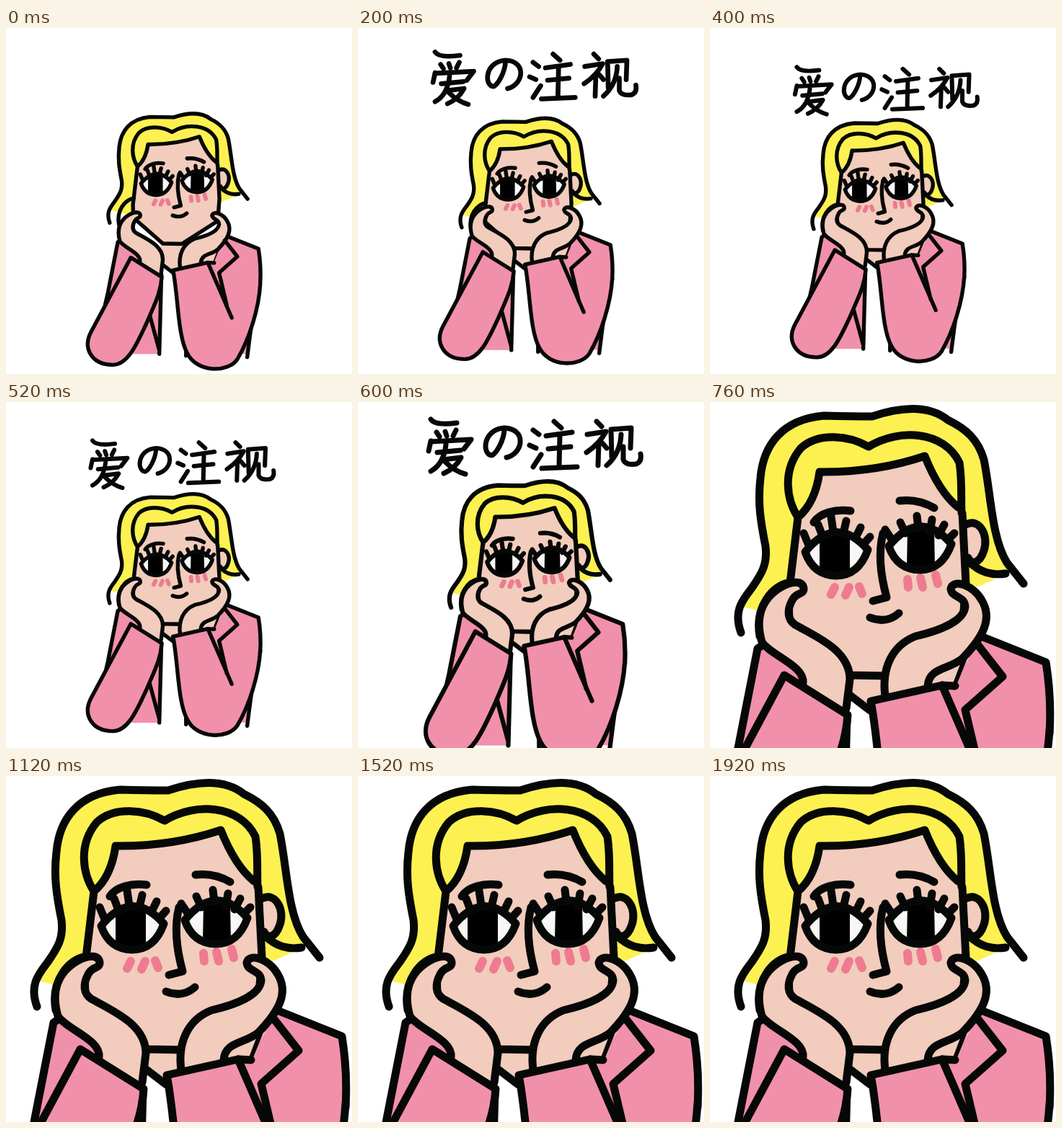
These frames come from a looping animation (480x480 px, 1960 ms). An HTML page:

```html
<!DOCTYPE html>
<html lang="zh">
<head>
<meta charset="utf-8">
<title>爱の注视</title>
<style>
  html, body { margin: 0; width: 100%; height: 100%; overflow: hidden; background: #fff; }
  svg { display: block; width: 100%; height: 100%; }
  path { fill: none; stroke-linecap: round; stroke-linejoin: round; }
  .ink { stroke: #060807; stroke-width: 11; }
  .skin { fill: #f2ccbc; }
  .hair { fill: #fdf151; }
  .coat { fill: #f190ab; }
  .white { fill: #f7f7f5; }
  .pupil { fill: #000; }
  .blush { stroke: #ee7b8f; stroke-width: 12; }
  #lettering path { stroke: #060807; stroke-width: 7; }
</style>
</head>
<body>
<svg viewBox="0 0 480 480">
  <g id="lettering" role="img" aria-label="爱の注视">
    <!-- 爱 -->
    <path d="M101 24Q107 33 137 29M109 42L113 48M121 41L123 47M136 39L132 47M101 54L98 68M101 55L157 52L147 65M110 70L142 67M122 59Q119 86 101 96M118 80L143 77Q135 92 119 99M121 83Q134 96 149 100"/>
    <!-- の -->
    <path d="M203 39C202 53 193 70 186 74C172 74 172 38 203 36C234 37 230 71 206 77"/>
    <!-- 注 -->
    <path d="M243 39L251 45M238 60L247 64M243 90L254 73M272 27L282 36M261 47L297 42M264 65L295 62M280 46L279 89M255 92L304 90"/>
    <!-- 视 -->
    <path d="M331 27L338 34M318 45L344 41Q335 58 317 70M334 56L333 88M339 57L345 64M352 76L351 38L379 36L378 64M365 45Q364 71 345 88M368 62V80Q371 88 386 86Q394 83 392 72"/>
  </g>

  <g id="figure">
    <g id="torso">
      <path class="coat" d="M70 335L110 328L190 434L184 660H106L-10 600L38 490Z"/>
      <path class="coat" d="M376 325L466 361C478 430 465 540 434 660L258 650L245 415L340 390L370 335Z"/>
      <path class="skin" d="M188 330H262V415L222 430L188 403Z"/>
      <path class="ink" d="M188 402L222 428M112 322L192 395M72 338L66 342L38 485L30 520M190 434L184 660M155 543L184 650M260 600V665
        M376 325L466 361Q474 410 471 460M450 543L434 669M352 354L336 393"/>
    </g>

    <g id="head">
      <path class="hair" d="M45 284C52 260 78 232 78 205C72 165 68 140 70 105C74 60 100 22 158 19Q195 20 225 20C270 5 305 5 330 25C355 37 372 52 380 80C388 120 394 180 415 237L358 262L110 300Z"/>
      <path class="skin ink" d="M355 170C374 160 387 186 380 206C374 225 362 226 358 216"/>
      <path class="skin" d="M122 160Q146 140 152 97Q230 98 298 75Q318 122 350 152L355 258L350 315L248 380H194L110 305L109 268Z"/>
      <path class="ink" d="M122 160L109 268L110 305L194 379L248 380L350 315L355 252L350 154
        M43 320C32 290 45 275 58 258C72 238 80 225 77 200C70 165 66 140 70 105C74 60 100 24 158 19Q195 20 225 20C270 5 305 5 330 25C355 37 372 52 380 80C390 130 391 190 412 223L435 252
        M122 160C106 135 100 95 126 64C150 42 192 46 220 62C262 36 325 40 346 84C350 110 348 130 349 154
        M122 160Q146 140 152 97Q230 98 298 75Q318 125 344 146
        M360 222C374 236 392 241 410 238
        M69 325C62 285 85 255 112 250"/>
      <path class="ink" d="M144 167C152 154 174 148 195 151M263 137Q289 134 311 147M240 182C233 210 237 242 245 271L226 276M222 299Q245 308 262 293"/>
      <path class="blush" d="M173 257L168 267M193 257L188 268M207 256L211 266M274 246L275 257M292 244L295 257M313 240L316 252"/>
      <g id="eyes">
        <path class="white" d="M132 208Q175 155 219 205Q206 241 175 241Q143 240 132 208Z"/>
        <path class="white" d="M248 200Q291 147 335 197Q322 233 291 233Q259 232 248 200Z"/>
        <path class="pupil" d="M152 186Q174 174 194 184V238H152ZM274 178Q293 168 311 178L312 230H273Z"/>
        <path class="ink" d="M132 208Q175 155 219 205Q206 241 175 241Q143 240 132 208ZM248 200Q291 147 335 197Q322 233 291 233Q259 232 248 200Z"/>
        <path class="ink" d="M137 199L130 182M150 170L156 186M168 159L171 180M189 165L185 182M209 174L202 188M222 187L213 197
          M243 177L253 192M264 167L271 182M287 158L289 175M308 163L305 180M325 170L317 185M339 182L331 190"/>
      </g>
    </g>

    <g id="arms">
      <path class="skin" d="M72 333C62 298 72 272 100 256C118 247 130 249 130 260C112 266 104 288 116 308C145 326 190 345 194 385L189 434L128 390Q124 365 72 333Z"/>
      <path class="ink" d="M129 390C132 366 85 352 72 333C62 298 72 272 100 256C118 247 130 249 130 260C129 268 120 263 114 275C106 290 108 302 118 309C150 327 194 345 194 385L189 425"/>
      <path class="skin" d="M245 420C236 370 252 338 285 325C325 316 352 302 354 284C353 268 335 272 334 259C338 244 366 255 377 275C392 300 380 325 350 356L336 393L302 396Z"/>
      <path class="ink" d="M243 408C238 370 252 338 285 325C325 316 352 302 354 284C353 268 335 272 334 259C338 244 366 255 377 275C392 300 380 325 350 356C330 372 304 368 302 394M322 393L340 394"/>
      <path class="coat ink" d="M103 379L-10 590C-35 637 -8 684 52 684C96 684 122 620 147 567C171 510 188 480 191 434Z"/>
      <path class="coat" d="M223 415L322 393L354 470L471 455C467 525 440 610 406 668C380 707 292 707 264 652C236 603 238 490 223 415Z"/>
      <path class="ink" d="M390 550L322 393L223 415C238 490 236 603 264 652C292 707 380 707 406 668C440 610 467 525 471 455"/>
    </g>
    <path id="lapel" class="ink" d="M370 335L406 381L354 427L376 520"/>
  </g>
</svg>
<script>
const LOOP = 1960, STEP = 40, ZOOM_START = 14, ZOOM_STEPS = 5, FULL_ZOOM = 2.05;
const LETTERING_ZOOM = FULL_ZOOM ** (1 / ZOOM_STEPS);
const BLINKS = [27, 37, 47];
const place = (id, transform) => document.getElementById(id).setAttribute('transform', transform);
const scaleAt = (x, y, sx, sy = sx) =>
  `translate(${x} ${y}) scale(${sx} ${sy}) translate(${-x} ${-y})`;
const centred = scale => scaleAt(240, 240, scale);
const shiftY = y => `translate(0 ${y})`;

function draw(time) {
  const step = Math.floor(time % LOOP / STEP);
  const zoomed = Math.min(Math.max(step - ZOOM_START, 0), ZOOM_STEPS) / ZOOM_STEPS;
  const zoom = FULL_ZOOM ** zoomed;

  // The head sinks into the rising hands.
  const apart = (1 - Math.min(step / ZOOM_START, 1)) ** 3;
  place('figure', centred(zoom / FULL_ZOOM));
  place('head', shiftY(-18 * apart));
  place('torso', shiftY(15 * apart));
  place('lapel', shiftY(17 * apart));
  place('arms', shiftY(22 * apart));

  // Damped spring: peaks at 1.08 on step 6.
  const phase = Math.PI * step / 6;
  const pop = step < ZOOM_START ? 1 - Math.exp(-phase / 1.24) * Math.cos(phase) : 1;
  place('lettering', centred(pop * zoom / LETTERING_ZOOM));

  place('eyes', BLINKS.includes(step) ? scaleAt(235, 212, 1, 0.2) : '');
}

const start = performance.now();
function tick() {
  draw(performance.now() - start);
  requestAnimationFrame(tick);
}
tick();
</script>
</body>
</html>
```
